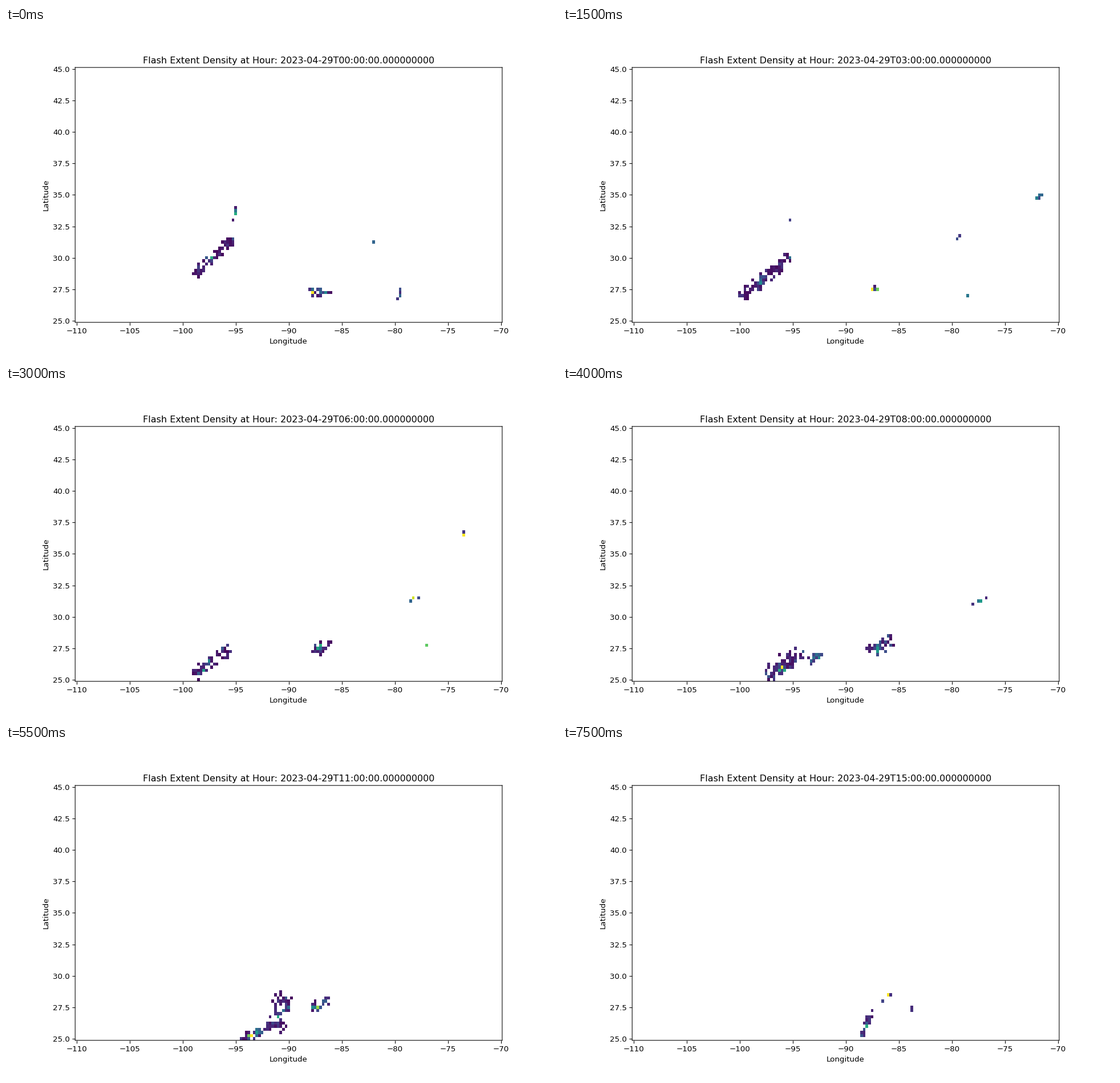
A matplotlib script that plays this animation: 966 by 580 pixels, repeating every 8000 ms.

```python
import numpy as np
import matplotlib.pyplot as plt
from matplotlib.animation import FuncAnimation

W, H, HOURS = 966, 580, 16
S = 0.966  # overall scale of type and lines

plt.rcParams.update({
    "font.family": "DejaVu Sans",
    "font.size": 10 * S,
    "axes.titlesize": 11.53,
    "axes.titlepad": 5.4,
    "axes.linewidth": 0.8 * S,
    "axes.labelpad": 4 * S,
})
for axis in ("xtick", "ytick"):
    plt.rcParams.update({f"{axis}.major.size": 3.5 * S,
                         f"{axis}.major.pad": 3.5 * S,
                         f"{axis}.major.width": 0.8 * S})

# Quarter-degree grid
lon = np.linspace(-110, -70, 161)
lat = np.linspace(25, 45, 81)
cols, rows = np.meshgrid(np.arange(lon.size), np.arange(lat.size))
flashes = np.zeros((HOURS, lat.size, lon.size))


def rain(hour, c0, r0, c1, r1, count):
    """Light the cells nearest a storm line, with ragged edges and a hot core."""
    rng = np.random.default_rng([hour, int(c0), int(r0)])
    count = int(round(count))
    dx, dy = c1 - c0, r1 - r0
    length = np.hypot(dx, dy)
    t = np.clip(((cols - c0) * dx + (rows - r0) * dy) / max(length**2, 1e-9), 0, 1)
    dist = np.hypot(cols - c0 - t * dx, rows - r0 - t * dy)

    ragged = dist + rng.random(dist.shape) * count / (length + 1)
    lit = np.argsort(ragged, axis=None)[:count]
    core = np.exp(-((t - 0.4) * length / 2)**2 - dist**2).flat[lit]
    heat = (0.3 + rng.exponential(1, count)) * (1 + 4 * core)
    layer = flashes[hour].reshape(-1)
    layer[lit] = np.maximum(layer[lit], heat)


def storm(*keys):
    """Drift a storm line through keys (hour, col, row, col, row, cells)."""
    hours, *tracks = np.array(keys, float).T
    for hour in range(int(hours[0]), int(hours[-1]) + 1):
        rain(hour, *(np.interp(hour, hours, track) for track in tracks))


# Western squall line
storm((0, 45, 15, 59, 26, 42), (3, 41, 8, 59, 20, 60), (6, 45, 2, 56, 9, 38),
      (8, 52, 1, 61, 8, 52), (10, 63, 0, 71, 5, 40), (11, 63, 0, 75, 5, 30))
storm((0, 59, 32, 60, 36, 4), (3, 59, 32, 59, 32, 1))
# Gulf
storm((8, 67, 6, 70, 8, 11), (10, 73, 6, 77, 11, 27),
      (13, 84, 6, 80, 15, 62), (15, 86, 1, 90, 9, 15))
storm((0, 89, 9, 96, 9, 14), (3, 90, 10, 92, 10, 4), (8, 90, 9, 96, 12, 26),
      (13, 90, 11, 93, 11, 7), (15, 94, 12, 97, 14, 3))
# Coast and open ocean
storm((0, 121, 7, 122, 10, 4), (3, 126, 8, 126, 8, 1), (6, 132, 11, 132, 11, 1))
storm((0, 112, 25, 112, 25, 1), (3, 122, 26, 123, 27, 2),
      (8, 128, 24, 133, 26, 4), (10, 135, 24, 135, 24, 1))
storm((1, 154, 38, 155, 38, 2), (3, 152, 39, 154, 40, 4))
storm((5, 145, 44, 145, 45, 2), (7, 147, 48, 147, 49, 2))
storm((9, 158, 29, 158, 29, 1), (10, 160, 22, 160, 22, 1))
storm((10, 144, 55, 144, 55, 1))
storm((13, 103, 8, 103, 9, 2), (15, 105, 9, 105, 10, 2))

density = np.ma.masked_equal(flashes, 0)
density = density / density.max(axis=(1, 2), keepdims=True)

fig, ax = plt.subplots(figsize=(W / 100, H / 100), dpi=100)
fig.subplots_adjust(left=0.1255, right=0.9005, bottom=0.1108, top=0.8808)
mesh = ax.pcolormesh(lon, lat, density[0], cmap="viridis", vmin=0, vmax=1,
                     shading="nearest")
ax.set_xlabel("Longitude")
ax.set_ylabel("Latitude")
for spine in ax.spines.values():
    spine.set_snap(False)


def update(hour):
    mesh.set_array(density[hour])
    ax.set_title(f"Flash Extent Density at Hour: 2023-04-29T{hour:02d}:00:00.000000000")
    return mesh, ax.title


anim = FuncAnimation(fig, update, frames=HOURS, interval=500, repeat=True,
                     repeat_delay=0, blit=False)
plt.show()
```
